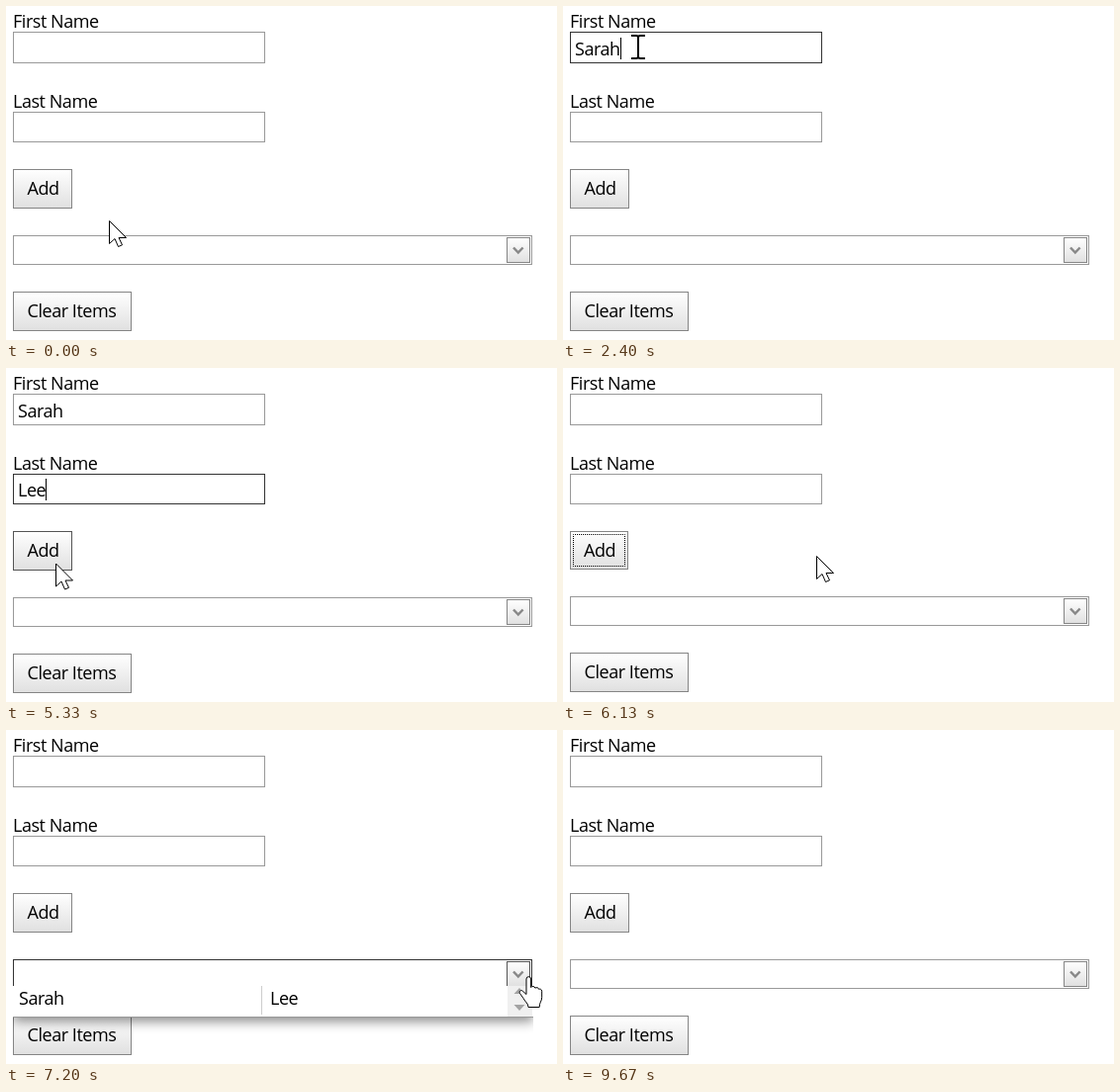
Animation of 557 by 338 pixels, one loop 9740 ms. Source, as an HTML page:

```html
<!DOCTYPE html>
<html lang="en">
<head>
<meta charset="utf-8">
<title>Add items form</title>
<style>
  html, body { margin: 0; width: 100%; height: 100%; overflow: hidden; background: #fff; }
  svg { display: block; font: 18px "Open Sans", "Noto Sans", sans-serif; letter-spacing: -.45px; }
  .box { fill: #fff; stroke: #999; }
  .box.focus { stroke: #333; }
  .button { fill: url(#shade); stroke: #858585; }
  .button.hover { stroke: #555; }
  .list { fill: #fff; filter: drop-shadow(0 4px 6px rgba(0, 0, 0, .45)); }
  .line { stroke: #ccc; }
  .edge { stroke: #999; }
  .pointer { fill: #fff; stroke: #000; stroke-linejoin: round; }
</style>
</head>
<body>
<svg width="557" height="338" viewBox="0 0 557 338">
  <defs>
    <linearGradient id="shade" x2="0" y2="1">
      <stop stop-color="#fff"/>
      <stop offset=".45" stop-color="#f1f1f1"/>
      <stop offset="1" stop-color="#e0e0e0"/>
    </linearGradient>
    <clipPath id="slide"><rect x="7" y="259" width="526" height="79"/></clipPath>
  </defs>

  <text x="7" y="22">First Name</text>
  <rect id="firstBox" class="box" x="7.5" y="26.5" width="254" height="31"/>
  <text id="firstText" x="12" y="50"></text>

  <text x="7" y="103">Last Name</text>
  <rect id="lastBox" class="box" x="7.5" y="107.5" width="254" height="30"/>
  <text id="lastText" x="12" y="130"></text>

  <rect id="addBox" class="button" x="7.5" y="165.5" width="59" height="39"/>
  <rect id="addFocus" x="10.5" y="168.5" width="52" height="32" fill="none" stroke="#000"
    stroke-dasharray="1" stroke-dashoffset=".5"/>
  <text id="addText" x="21.5" y="191">Add</text>

  <g id="lower">
    <rect id="comboBox" class="box" x="7.5" y="232.5" width="524" height="29"/>
    <rect id="arrowBox" class="button" x="506.5" y="234.5" width="23" height="25"/>
    <path d="M513 244.5l4.8 5 4.8-5" fill="none" stroke="#888" stroke-width="2.5"/>
    <rect class="button" x="7.5" y="289.5" width="119" height="39"/>
    <text x="21.5" y="315">Clear Items</text>
  </g>

  <g id="opening" clip-path="url(#slide)">
    <rect class="list" x="7" y="250" width="526" height="41"/>
    <path class="edge" d="M7 290.5h526"/>
    <path class="line" d="M258.5 259v29"/>
    <rect x="507" y="259" width="25" height="31" fill="#f0f0f0"/>
    <path d="M513.5 267h11l-5.5-6zM513.5 278h11l-5.5 6z" fill="#a3a3a3"/>
    <text x="13" y="278">Sarah</text>
    <text x="267" y="278">Lee</text>
  </g>

  <g id="opened">
    <rect class="list" x="7" y="259" width="526" height="72"/>
    <rect class="edge" x="7.5" y="259.5" width="525" height="71" fill="#fff"/>
    <rect class="edge" x="7.5" y="259.5" width="525" height="33" fill="#dcdcdc"/>
    <path class="edge" d="M270.5 260v32"/>
    <path class="line" d="M270.5 295v32M8 327.5h524"/>
    <text x="13" y="282">First Name</text>
    <text x="279.5" y="282">Last Name</text>
    <text x="13" y="317">Sarah</text>
    <text x="279.5" y="317">Lee</text>
  </g>

  <path id="caret" d="M.5 0v22" stroke="#000"/>

  <g id="cursor">
    <path id="arrow" class="pointer" d="M-.5.5V23.5L5 18.5L8.5 26.5L12.5 24.8L9 17.5H16.5z"/>
    <path id="beam" fill="none" stroke="#000" stroke-width="2"
      d="M-7-11.5h5q2 0 2 2v19q0 2-2 2h-5M7-11.5h-5q-2 0-2 2M7 11.5h-5q-2 0-2-2"/>
    <path id="hand" class="pointer" transform="translate(-11 -.5)"
      d="M8 19V3.500a2.300 2.300 0 0 1 4.600 0V12c1-1.500 4-1.300 4.300.7 1-1 3.600-.7 3.800 1.200 1.200-.7 3 0 3 1.800V22c0 4-2.500 5-2.500 10H10c0-4-3-5-5-9L1.500 18c-1.300-2.400 1.400-4 3.200-2z"/>
  </g>
</svg>
<script>
const LOOP = 9740, STEP = 1000 / 15, BLINK = 533;
const CLICK_FIRST = 730, CLICK_LAST = 3530, CLICK_ADD = 5670, CLEARED = 5730;
const HOVER_COMBO = 7000, CLICK_COMBO = 7200, OPENED = 7270, CLOSED = 9670;

const $ = id => document.getElementById(id);
const show = (id, on) => $(id).style.display = on ? '' : 'none';
const mark = (id, name, on) => $(id).classList.toggle(name, on);
const place = (id, x, y) => $(id).setAttribute('transform', `translate(${x} ${y})`);

const first = { word: 'Sarah', from: 1400, gap: 250 };
const last = { word: 'Lee', from: 4400, gap: 200 };

// Pointer moves: start, end, and where each one leads
const moves = [
  [0, 330, 64, 60], [330, 467, 76, 41.5],
  [2867, 3467, 76, 114.5],
  [5000, 5400, 50, 200],
  [5933, 6133, 257, 190], [6133, 6933, 529, 249],
  [7733, 8133, 534, 345]
];

function pointer(t) {
  let x = 105, y = 217;
  for (const [from, to, toX, toY] of moves) {
    const k = Math.min(Math.max((t - from) / (to - from), 0), 1);
    const eased = k * (2 - k);
    x += (toX - x) * eased;
    y += (toY - y) * eased;
  }
  return [Math.round(x), Math.round(y * 2) / 2];
}

// Letters typed so far, and the time of the latest key
function typing(t, { word, from, gap }) {
  const count = Math.min(Math.max(Math.floor((t - from) / gap) + 1, 0), word.length);
  return { text: word.slice(0, count), key: count && from + (count - 1) * gap };
}

function drawCaret(t, field, typed, focused, y) {
  const since = Math.max(focused, typed.key);
  const width = typed.text ? Math.round(field.getComputedTextLength()) - 1 : 0;
  show('caret', (t - since) % (2 * BLINK) < BLINK);
  place('caret', 13 + width, y);
}

function draw(now) {
  const t = now % LOOP;
  const within = (from, to) => t >= from && t < to;
  const inFirst = within(CLICK_FIRST, CLICK_LAST), inLast = within(CLICK_LAST, CLICK_ADD);
  const pressed = within(CLICK_ADD, CLICK_COMBO), inCombo = within(CLICK_COMBO, CLOSED);
  const opened = within(OPENED, CLOSED);

  const firstTyped = typing(t, first), lastTyped = typing(t, last);
  $('firstText').textContent = t < CLEARED ? firstTyped.text : '';
  $('lastText').textContent = t < CLEARED ? lastTyped.text : '';
  mark('firstBox', 'focus', inFirst);
  mark('lastBox', 'focus', inLast);
  mark('comboBox', 'focus', inCombo);

  $('addBox').setAttribute('width', pressed ? 58 : 59);
  $('addBox').setAttribute('height', pressed ? 38 : 39);
  place('addText', pressed ? -.5 : 0, 0);
  show('addFocus', pressed);
  place('lower', 0, pressed ? -1 : 0);

  show('opening', inCombo && !opened);
  show('opened', opened);

  if (inFirst) drawCaret(t, $('firstText'), firstTyped, CLICK_FIRST, 32);
  else if (inLast) drawCaret(t, $('lastText'), lastTyped, CLICK_LAST, 112);
  else if (opened) drawCaret(t, null, { text: '', key: 0 }, OPENED, 237);
  else show('caret', false);

  const [x, y] = pointer(Math.floor((t + 3.4) / STEP) * STEP);
  const onBeam = y < 138, onHand = within(HOVER_COMBO, 7800);
  place('cursor', x, y);
  show('cursor', t < 8130);
  show('beam', onBeam);
  show('hand', onHand);
  show('arrow', !onBeam && !onHand);
  mark('addBox', 'hover', x < 67 && y > 165 && y < 205);
  mark('arrowBox', 'hover', onHand);
}

const start = performance.now();
function loop() {
  draw(performance.now() - start);
  requestAnimationFrame(loop);
}
loop();
</script>
</body>
</html>
```
